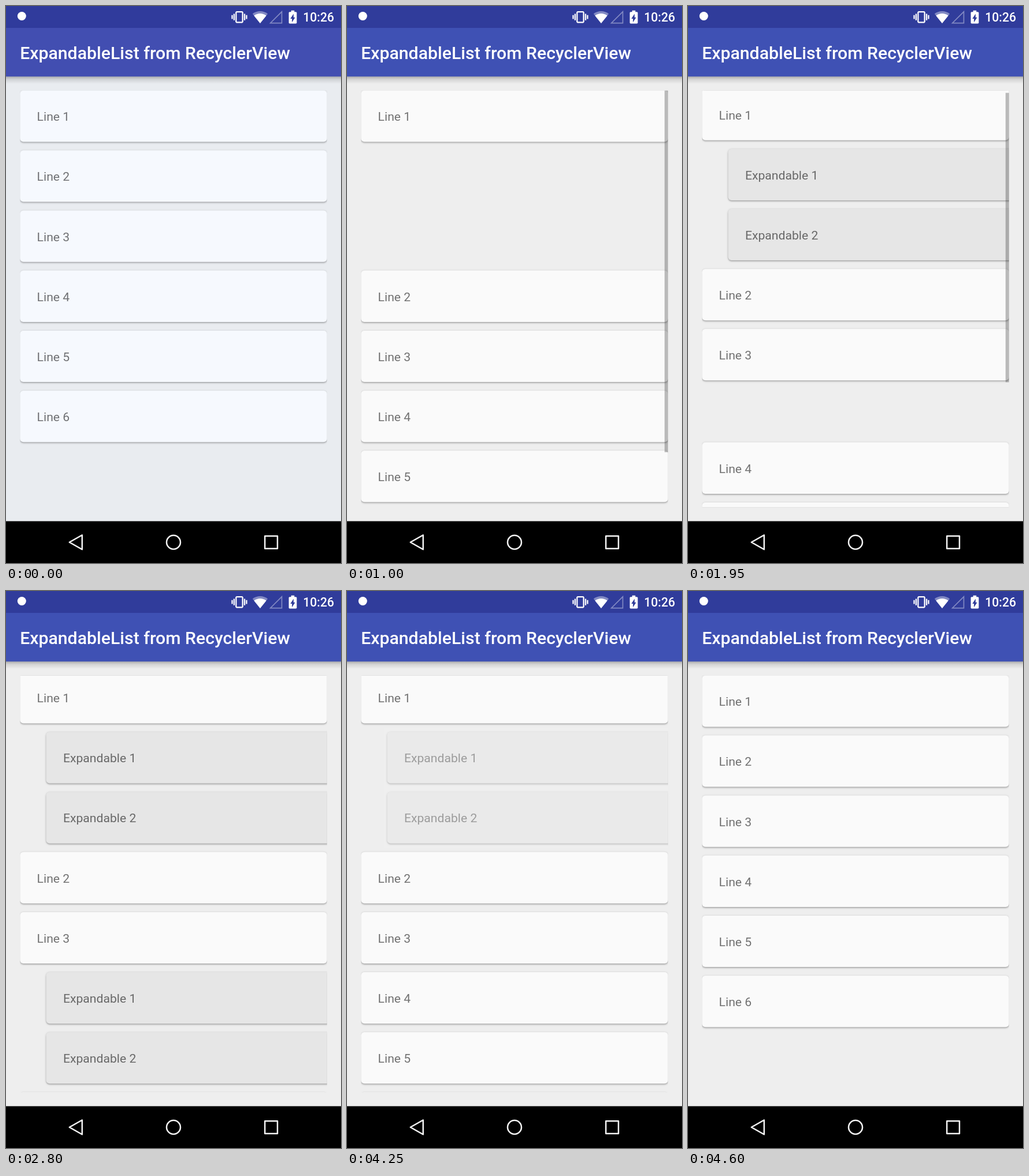
An HTML page with a canvas that plays this animation: 580 by 966 pixels, repeating every 4.65 s.

```html
<!DOCTYPE html>
<html lang="en">
<head>
<meta charset="utf-8">
<title>Expandable list</title>
<style>
  html, body { margin: 0; width: 100%; height: 100%; overflow: hidden; background: #000; }
  canvas { display: block; }
</style>
</head>
<body>
<canvas id="stage" width="580" height="966"></canvas>
<script>
const ctx = document.getElementById('stage').getContext('2d');
const W = 580, H = 966, LOOP = 4650, STEP = 50;
const SX = W / 768, SY = H / 1280;      // the phone screen is 768 x 1280

// List geometry in phone pixels
const LIST = { x: 32, y: 194, w: 704, h: 958 };
const PITCH = 138, CARD_H = 118, INDENT = 60, OVERSCROLL = 8;
const MOVE = 250, FADE = 120;

// Moments at which the rows start to move
const OPEN_1 = 750, OPEN_3 = 1834, CLOSE_3 = 3028, CLOSE_1 = 4319;

const TINTED = { status: '#303b9c', bar: '#424eb1', bg: '#e9ecf0', card: '#f6f9fe' };
const PLAIN = { status: '#303c9b', bar: '#3f51b4', bg: '#eeeeee', card: '#fafafa' };
const CHILD = '#e6e6e6';

const ramp = (t, start, length) => Math.min(1, Math.max(0, (t - start) / length));
const ease = (t, start, length) => (1 - Math.cos(Math.PI * ramp(t, start, length))) / 2;
const move = (t, start) => ease(t, start, MOVE);
const fade = (t, start) => ease(t, start, FADE);

function rect(x, y, w, h, color) {
  ctx.fillStyle = color;
  ctx.fillRect(x, y, w, h);
}

function text(str, x, y, size, color, weight = 400, align = 'left') {
  ctx.font = `${weight} ${size}px Roboto, sans-serif`;
  ctx.textAlign = align;
  ctx.fillStyle = color;
  ctx.fillText(str, x, y);
}

function inPhone(draw) {
  ctx.save();
  ctx.scale(SX, SY);
  draw();
  ctx.restore();
}

function card(label, x, y, color) {
  if (y > LIST.y + LIST.h) return;
  ctx.save();
  ctx.beginPath();
  ctx.roundRect(x, y, LIST.w, CARD_H, 8);
  ctx.fillStyle = color;
  for (const [dy, blur, alpha] of [[0, 2.5, 0.16], [2, 2.5, 0.24]]) {
    ctx.shadowColor = `rgba(0,0,0,${alpha})`;
    ctx.shadowBlur = blur;
    ctx.shadowOffsetY = dy;
    ctx.fill();
  }
  ctx.restore();
  text(label, x + 39, y + 70, 28, 'rgba(0,0,0,0.55)');
}

function children(first, scroll, alpha, bg) {
  if (alpha <= 0) return;
  for (let i = 0; i < 2; i++) {
    const x = LIST.x + INDENT, y = LIST.y + (first + i) * PITCH - scroll;
    card(`Expandable ${i + 1}`, x, y, CHILD);
    // On an even background a veil equals group opacity
    ctx.globalAlpha = 1 - alpha;
    rect(x - 8, y - 8, LIST.w, CARD_H + 18, bg);
    ctx.globalAlpha = 1;
  }
}

function scrollbar(rows, offset, alpha) {
  const range = rows * PITCH;
  rect(728, LIST.y + offset * LIST.h / range, 8, LIST.h * LIST.h / range, `rgba(0,0,0,${0.26 * alpha})`);
}

function list(t, colors) {
  const open1 = move(t, OPEN_1) - move(t, CLOSE_1);
  const open3 = move(t, OPEN_3) - move(t, CLOSE_3);
  const scroll = OVERSCROLL * (move(t, OPEN_3) - move(t, CLOSE_1));

  ctx.beginPath();
  ctx.rect(LIST.x, LIST.y, LIST.w, LIST.h);
  ctx.clip();

  children(1, scroll, fade(t, OPEN_1 + MOVE) - fade(t, CLOSE_1 - FADE), colors.bg);
  children(5, scroll, fade(t, OPEN_3 + MOVE) - fade(t, CLOSE_3 - FADE), colors.bg);
  for (let i = 0; i < 6; i++) {
    const shift = 2 * PITCH * ((i > 0) * open1 + (i > 2) * open3);
    card(`Line ${i + 1}`, LIST.x, LIST.y + i * PITCH + shift - scroll, colors.card);
  }

  if (t >= OPEN_3) scrollbar(10, OVERSCROLL, 1 - ramp(t, 2550, 250));
  else if (t >= OPEN_1) scrollbar(8, 0, 1 - ramp(t, 1490, 250));
}

// Draws a path given on a 24-unit grid around a centre
function icon(cx, path, alpha = 1, sx = 1.133) {
  ctx.save();
  ctx.translate(cx, 19.2);
  ctx.scale(sx, 1.133);
  ctx.translate(-12, -12);
  ctx.fillStyle = `rgba(255,255,255,${alpha})`;
  ctx.fill(new Path2D(path), 'evenodd');
  ctx.restore();
}

function statusBar(color) {
  rect(0, 0, W, 38, color);
  ctx.fillStyle = '#fff';
  ctx.beginPath();
  ctx.arc(27.3, 17.5, 7.5, 0, 7);
  ctx.fill();
  icon(404, 'M0 9h2v6h-2zM3 7h2v10h-2zM19 7h2v10h-2zM22 9h2v6h-2zM7.5 3h9L18 4.5v15L16.5 21h-9L6 19.5v-15zM8 5v14h8V5z');
  icon(440, 'M12 21.5L.4 7Q5.500 3 12 3T23.600 7z', 0.4);
  icon(440, 'M12 21.5L2.600 9.800Q7 6.500 12 6.500T21.400 9.800z');
  icon(467, 'M22 2L2 22H22zM20.500 5.600V20.500H5.600z', 0.4);
  icon(496.5, 'M10 2h4v2h2L17 5v16l-1 1H8l-1-1V5l1-1h2zM13 7l-4 7.500h2V20l4-7.500h-2z', 1, 1.38);
  text('10:26', 568, 27.2, 21.2, '#fff', 500, 'right');
}

function appBar(color) {
  const shade = ctx.createLinearGradient(0, 122, 0, 135);
  shade.addColorStop(0, 'rgba(0,0,0,0.28)');
  shade.addColorStop(0.4, 'rgba(0,0,0,0.11)');
  shade.addColorStop(1, 'rgba(0,0,0,0)');
  rect(0, 122, W, 13, shade);
  rect(0, 38, W, 84.3, color);
  inPhone(() => text('ExpandableList from RecyclerView', 32, 121.7, 40, '#fff', 500));
}

function navBar() {
  rect(0, 893.5, W, H - 893.5, '#000');
  ctx.strokeStyle = '#f4f4f4';
  ctx.lineWidth = 2.5;
  ctx.lineJoin = 'round';
  ctx.beginPath();
  ctx.moveTo(109.8, 930);
  ctx.lineTo(131.800, 917.5);
  ctx.lineTo(131.800, 942.5);
  ctx.closePath();
  ctx.moveTo(302, 930);
  ctx.arc(290, 930, 12, 0, 2 * Math.PI);
  ctx.rect(448.2, 919.2, 21.800, 21.800);
  ctx.stroke();
}

function draw(t) {
  const colors = t < 650 ? TINTED : PLAIN;
  rect(0, 0, W, H, colors.bg);
  inPhone(() => list(t, colors));
  appBar(colors.bar);
  statusBar(colors.status);
  navBar();
}

const start = performance.now();
function tick(now) {
  const t = Math.max(0, now - start) % LOOP;
  draw(Math.floor(t / STEP) * STEP);
  requestAnimationFrame(tick);
}
draw(0);
requestAnimationFrame(tick);
</script>
</body>
</html>
```
